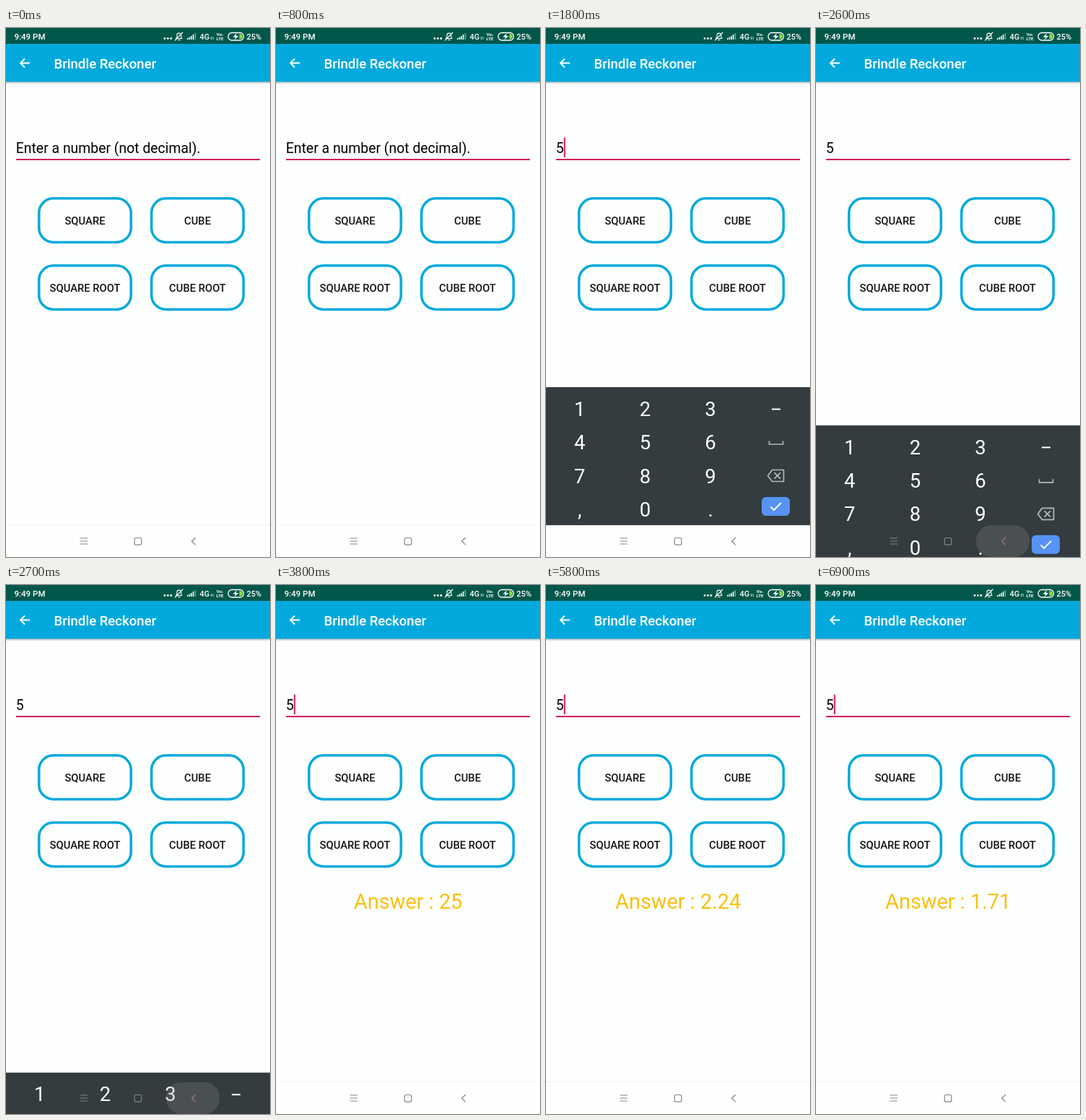
Write an HTML page that moves like this. It is 366x732 px and loops after 7 s.

```html
<!DOCTYPE html>
<html lang="en">
<head>
<meta charset="utf-8">
<title>Calculator demo</title>
<style>
html, body { margin: 0; width: 100%; height: 100%; overflow: hidden; background: #fdfffe; }
svg { display: block; width: 100vw; height: 100vh; font-family: Roboto, sans-serif; }
.mid { text-anchor: middle; }
.med { font-weight: 500; }
.line { fill: none; stroke-linecap: round; stroke-linejoin: round; }
</style>
</head>
<body>
<svg viewBox="0 0 366 732">
  <defs>
    <linearGradient id="shade" x2="0" y2="1">
      <stop stop-color="#000" stop-opacity=".28"/>
      <stop offset="1" stop-color="#000" stop-opacity="0"/>
    </linearGradient>
  </defs>
  <rect width="366" height="732" fill="#fdfffe"/>

  <!-- app bar -->
  <rect y="74" width="366" height="4" fill="url(#shade)"/>
  <rect y="22" width="366" height="52.5" fill="#03a9dc"/>
  <path class="line" d="M33 48.5H20.5M26 42.5l-6 6 6 6" stroke="#fff" stroke-width="1.9" style="stroke-linecap:butt;stroke-linejoin:miter"/>
  <text class="med" x="66.5" y="55.5" font-size="18.6" fill="#fff">Brindle Reckoner</text>

  <!-- status bar -->
  <rect width="366" height="22" fill="#00574a"/>
  <g fill="#fff">
    <text class="med" x="11.5" y="15.6" font-size="11.5">9:49 PM</text>
    <circle cx="220" cy="14.5" r="1.4"/><circle cx="224.4" cy="14.5" r="1.4"/><circle cx="228.8" cy="14.5" r="1.4"/>
    <path class="line" d="M235.5 14.5h8.5l-1.2-2v-2.5a2.9 2.9 0 0 0-5.8 0v2.500zM238.700 16.500h2.500M234.500 17l10.500-11" stroke="#fff" stroke-width="1.100"/>
    <path d="M251 16v-2h1.600v2zM253.600 16v-3.500h1.600v3.500zM256.200 16v-5h1.600v5zM258.800 16v-7h1.600v7z"/>
    <path d="M261.600 16v-9h1.600v9z" opacity=".45"/>
    <text class="med" x="268.500" y="15.600" font-size="10.800">4G</text>
    <path d="M284 12h1v4h-1zM286.500 12h1v4h-1z" opacity=".8"/>
    <text class="mid" x="296.500" y="10.800" font-size="6.200" font-weight="700">Vo›</text>
    <text class="mid" x="296.500" y="17" font-size="6.200" font-weight="700">LTE</text>
    <rect x="308" y="6.500" width="21.500" height="10.500" rx="5.200" fill="none" stroke="#fff" stroke-width="1.300"/>
    <path d="M323.500 8.300h1a3.500 3.500 0 0 1 0 7h-1z" fill="#8fdc3c"/>
    <path d="M320 7.300l-5.500 5.200h3.600l-1.300 3.700 5.700-5.200h-3.600z"/>
    <text class="med" x="333.500" y="15.600" font-size="11">25%</text>
  </g>

  <!-- input -->
  <text id="entry" y="172.700" font-size="19.400"></text>
  <rect x="14" y="181" width="338" height="2" fill="#d11c5e"/>
  <rect id="caret" y="151.500" width="2" height="27.500" fill="#d11c5e"/>

  <g id="buttons"></g>
  <text id="answer" class="mid" x="183.200" y="448" font-size="28.900" fill="#fbbf10"></text>

  <path d="M0 687.500H366" stroke="#f1f3f2"/>
  <g id="keyboard">
    <rect width="366" height="191" fill="#343c3f"/>
    <rect y="191" width="366" height="240" fill="#fdfffe"/>
    <g id="keys" class="mid" font-size="27.500" fill="#fff"></g>
    <path d="M313 30.500h12" stroke="#fff" stroke-width="2"/>
    <g class="line" stroke="#b4b9bb" stroke-width="1.700">
      <path d="M309.500 74.500v4.500h19v-4.500" style="stroke-linecap:butt;stroke-linejoin:miter"/>
      <path d="M313.500 114.500h16v16h-16l-6-8zM317 118.700l7.600 7.600m0-7.600l-7.600 7.600"/>
    </g>
    <rect x="299" y="152" width="39" height="26" rx="6" fill="#5793f5"/>
    <path class="line" d="M311.500 165.500l4.500 4.500 10-10" stroke="#fff" stroke-width="2" style="stroke-linecap:butt;stroke-linejoin:miter"/>
  </g>

  <!-- navigation -->
  <rect id="ripple" y="688" height="44" rx="21" fill="#8c8c8c"/>
  <g class="line" stroke="#858585" stroke-width="1.200">
    <path d="M103 706h9.500M103 710h9.500M103 714h9.500"/>
    <rect x="178.200" y="705.500" width="9.600" height="9.600" rx="2"/>
    <path id="back" d="M262.500 705.500l-5 4.700 5 4.700"/>
  </g>
</svg>
<script>
const LOOP = 7000, STEP = 100;
const TYPED = 1780, KB_TOP = 497, KB_TRAVEL = 235;
const $ = id => document.getElementById(id);
const clamp = v => Math.max(0, Math.min(1, v));
const part = (t, start, length) => clamp((t - start) / length);
const set = (id, attrs) => {
  for (const k in attrs) $(id).setAttribute(k, attrs[k]);
};

$("buttons").innerHTML = ["SQUARE", "CUBE", "SQUARE ROOT", "CUBE ROOT"].map((label, i) => {
  const x = 45.7 + (i % 2) * 156, y = 235.8 + (i >> 1) * 93;
  return `<rect x="${x}" y="${y}" width="127.6" height="60.600" rx="20" fill="none" stroke="#03a9dc" stroke-width="3.500"/>
    <text class="mid med" x="${x + 63.800}" y="${y + 36.400}" font-size="14.800" fill="#151515">${label}</text>`;
}).join("");

$("keys").innerHTML = [..."123456789,0."].map((c, i) =>
  `<text x="${46.700 + (i % 3) * 90.700}" y="${39.800 + Math.floor(i / 3) * 46.400}">${c}</text>`).join("");

const answers = [[3300, "25"], [4200, "125"], [5100, "2.24"], [5900, "1.71"]];

function caretOn(t) {
  const phase = t < TYPED ? t + 700 : t - TYPED;
  return phase % 1000 < 500;
}

function draw(t) {
  const typed = t >= TYPED;
  $("entry").textContent = typed ? "5" : "Enter a number (not decimal).";
  set("entry", { x: 13.8 });
  set("caret", { x: typed ? 24.800 : 14, opacity: caretOn(t) ? 1 : 0 });

  const last = answers.filter(a => t >= a[0]).pop();
  $("answer").textContent = last ? "Answer : " + last[1] : "";

  // keyboard decelerates in and accelerates out
  const away = (1 - part(t, 820, 203)) ** 2 + part(t, 2480, 253) ** 2;
  set("keyboard", {
    transform: `translate(0 ${KB_TOP + KB_TRAVEL * away})`,
    visibility: away < 1 ? "visible" : "hidden"
  });

  const grow = 14 + 23 * part(t, 2350, 250);
  const pressed = t >= 2400 ? 1 - part(t, 2700, 300) : 0;
  set("ripple", { x: 259 - grow, width: 2 * grow, opacity: 0.25 * pressed });
  set("back", { stroke: pressed ? "#a07a7a" : "#858585" });
}

let start;
function tick(now) {
  start ??= now;
  draw(Math.floor(((now - start) % LOOP) / STEP) * STEP);
  requestAnimationFrame(tick);
}
draw(0);
requestAnimationFrame(tick);
</script>
</body>
</html>
```
